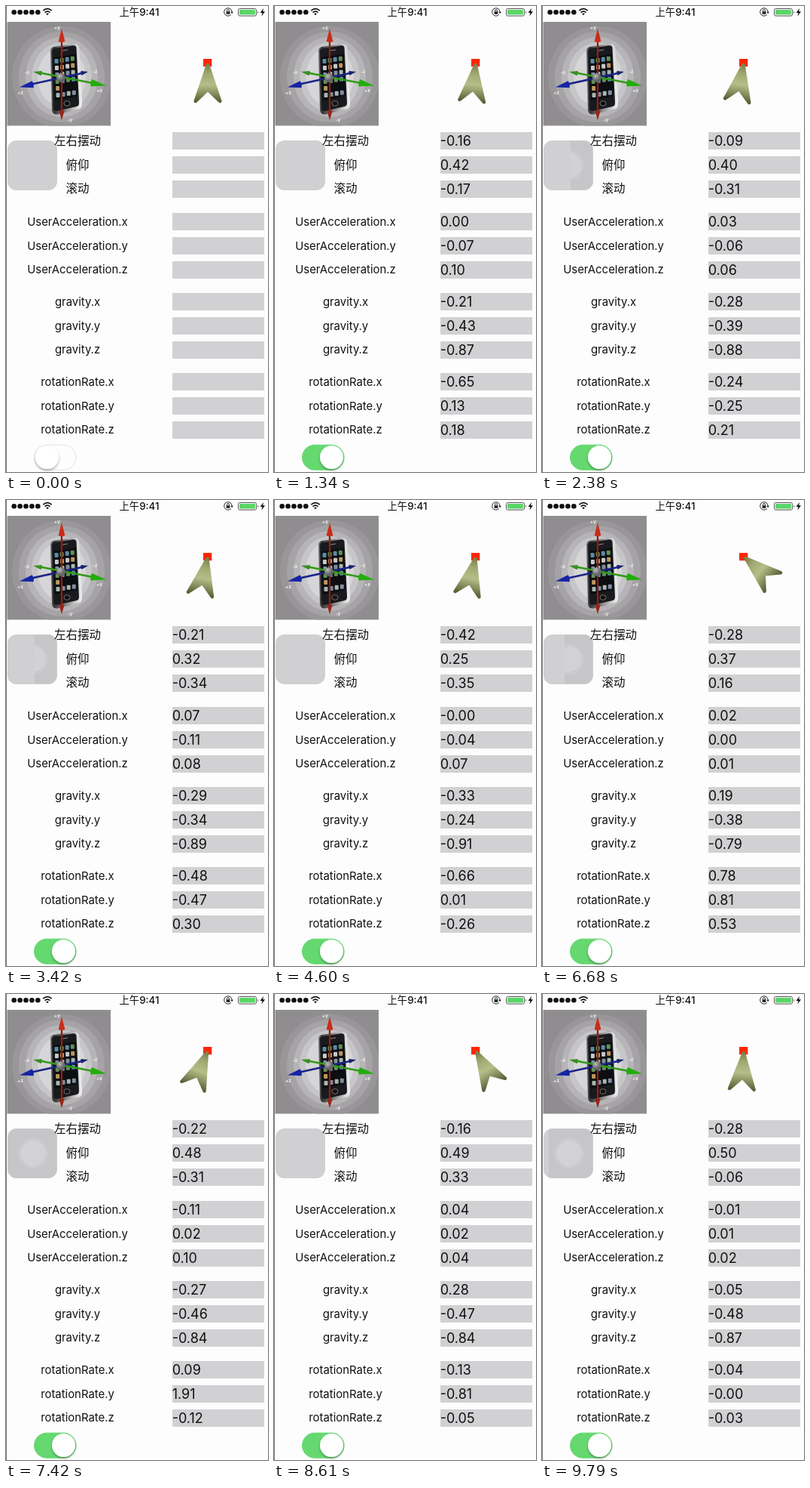
An HTML page that plays this animation: 348x617 px, repeating every 9.86 s.

```html
<!DOCTYPE html>
<html lang="zh">
<head>
<meta charset="utf-8">
<title>Device motion</title>
<style>
html, body { margin: 0; width: 100%; height: 100%; overflow: hidden; background: #fdfdfd; }
svg { display: block; width: 348px; height: 617px; }
text { font-family: Inter, "Noto Sans CJK SC", "Noto Sans CJK", sans-serif; fill: #111; }
.label { font-size: 14.9px; text-anchor: middle; }
.cjk { font-family: "Noto Sans CJK SC", "Noto Sans CJK", sans-serif; font-size: 15.5px; }
.value { font-size: 18px; }
.axis { font: bold 6.5px Inter, sans-serif; fill: #eee; text-anchor: middle; }
</style>
</head>
<body>
<svg id="stage" viewBox="0 0 348 617">
  <defs>
    <linearGradient id="olive" x1="0" y1="0" x2="0" y2="1">
      <stop offset="0" stop-color="#7a8049"/>
      <stop offset=".25" stop-color="#a1a972"/>
      <stop offset=".55" stop-color="#b5be89"/>
      <stop offset=".8" stop-color="#858b5b"/>
      <stop offset="1" stop-color="#5c6039"/>
    </linearGradient>
    <linearGradient id="rim">
      <stop offset="0" stop-color="#777"/>
      <stop offset=".1" stop-color="#333"/>
      <stop offset=".8" stop-color="#ccc"/>
      <stop offset="1" stop-color="#f2f2f2"/>
    </linearGradient>
    <radialGradient id="ball" cx=".35" cy=".3">
      <stop offset="0" stop-color="#bbb"/>
      <stop offset="1" stop-color="#666"/>
    </radialGradient>
    <filter id="shadow" x="-30%" y="-30%" width="160%" height="170%">
      <feDropShadow dx="0" dy="2" stdDeviation="1.4" flood-opacity=".32"/>
    </filter>
    <clipPath id="frame"><rect x="1.5" y="21" width="137.5" height="137.5"/></clipPath>
    <clipPath id="veil"><rect id="edge" y="178" width="68" height="66"/></clipPath>
  </defs>
  <rect width="348" height="617" fill="#fdfdfd"/>
  <rect width="1" height="617" fill="#777"/>

  <g id="status">
    <g id="dots"></g>
    <g fill="none" stroke="#111" stroke-width="1.7">
      <path d="M49.3 6.2Q55 1.2 60.7 6.2M51.5 8.7Q55 5.7 58.5 8.7"/>
      <path d="M53.2 10.2Q55 8.8 56.8 10.2L55 12.2Z" fill="#111" stroke="none"/>
    </g>
    <text x="177" y="12.6" text-anchor="middle" font-size="13.3" font-weight="500">上午9:41</text>
    <g fill="none" stroke="#222">
      <path d="M298.8 11.4A5.2 5.2 0 1 1 300.1 8"/>
      <path d="M293.4 7.5V6.4A1.6 1.6 0 0 1 296.6 6.4V7.5"/>
      <rect x="292.6" y="7.2" width="4.8" height="3.6" fill="#222" stroke="none"/>
      <path d="M298.3 7.8H301.9L300.1 10.2Z" fill="#222" stroke="none"/>
      <rect x="308.5" y="3.5" width="24" height="9.6" rx="2" stroke="#555"/>
      <rect x="310" y="5" width="21" height="6.6" rx=".8" fill="#5ad667" stroke="none"/>
      <path d="M334 6.5Q336 8.3 334 10.1Z" fill="#555" stroke="none"/>
      <path d="M342 3L337.6 9H340.4L339.4 13.6L344 7.3H341.2Z" fill="#111" stroke="none"/>
    </g>
  </g>

  <g id="picture" clip-path="url(#frame)">
    <g id="rings"></g>
    <path d="M59 60Q59 55 64 54L90 50Q96 49.5 97 55L101 129Q101 135 97 136.5L68 143.5Q62 144 61 138Z" fill="url(#rim)"/>
    <path d="M61 60Q61 57 65 56.2L89 52.3Q93 52 93.5 55.5L97 128Q97 132 94 133L68 139Q63.5 139.5 63 135Z" fill="#191a1d"/>
    <path d="M63 68L92.5 63.5L95 119L65 125.5Z" fill="#0c0e11"/>
    <g id="icons"></g>
    <ellipse cx="81" cy="129" rx="4" ry="3.4" fill="#111" stroke="#888" stroke-width=".8"/>
    <path d="M73 59.5L82 58" stroke="#888" stroke-width="1.2"/>
    <g id="axes"></g>
    <circle cx="73" cy="95" r="6" fill="url(#ball)"/>
  </g>

  <rect x="262" y="70" width="11.3" height="10.2" fill="#ff2600"/>
  <g id="pointer"><path d="M0 3L-16.3 51L0 35.5L16.3 51Z" fill="url(#olive)" stroke="url(#olive)" stroke-width="4.5" stroke-linejoin="round"/></g>

  <g id="assist">
    <rect x="2" y="178" width="66" height="66" rx="12" fill="#d0cfd2"/>
    <g clip-path="url(#veil)">
      <rect x="2.5" y="178.5" width="65" height="65" rx="11.5" fill="#c6c5c8" stroke="#cfced1"/>
      <circle cx="36" cy="211" r="19" fill="#cbcacd" stroke="#d2d1d4"/>
      <circle cx="36" cy="211" r="15.5" fill="#d2d1d4" stroke="#dad9dc"/>
    </g>
  </g>

  <g id="rows"></g>

  <rect id="track" x="37.5" y="581.2" width="55.5" height="33" rx="16.5"/>
  <circle id="knob" cy="597.5" r="15.5" fill="#fff" filter="url(#shadow)"/>
</svg>
<script>
const $ = id => document.getElementById(id);
const LOOP = 9860, STEP = 148.33;
const names = ['左右摆动', '俯仰', '滚动',
  ...['UserAcceleration', 'gravity', 'rotationRate'].flatMap(n => ['x', 'y', 'z'].map(a => n + '.' + a))];
const rowY = i => [179, 286, 392, 498][Math.floor(i / 3)] + (i % 3) * 31.7;

// step, pointer angle, then the twelve readings
const keys = [
  [16, 10, -.09, .40, -.31, .03, -.06, .06, -.28, -.39, -.88, -.24, -.25, .21],
  [31, 13, -.42, .25, -.35, -.001, -.04, .07, -.33, -.24, -.91, -.66, .01, -.26],
  [40, -120, -.40, .27, .67, .03, .08, -.08, .60, -.27, -.76, 1.28, .57, .61],
  [50, 22.5, -.22, .48, -.31, -.11, .02, .10, -.27, -.46, -.84, .09, 1.91, -.12],
  [58, -29, -.16, .49, .33, .04, .02, .04, .28, -.47, -.84, -.13, -.81, -.05],
  [66, 3, -.28, .50, -.06, -.01, .01, .02, -.05, -.48, -.87, -.04, -.001, -.03]
];
keys.unshift([0, 0, ...keys[5].slice(2)]);
const jitter = [.03, .02, .04, .06, .06, .06, .03, .02, .01, .5, .5, .3];

// step from which the dark face of the floating button shows, and its left edge
const veils = [[0, 68], [12, 38], [24, 68], [36, 30], [46, 2], [54, 68], [62, 9]];

$('dots').innerHTML = [0, 1, 2, 3, 4].map(i => `<circle cx="${10.7 + i * 7.9}" cy="8.2" r="3.3" fill="#111"/>`).join('');

$('rings').innerHTML = '<rect x="1" y="21" width="138" height="138" fill="#908d90"/>' +
  [[66, 67, '#999699'], [57, 60, '#a5a3a5'], [48, 53, '#b6b4b6'], [40, 46, '#c6c5c7'], [32, 39, '#d6d5d7']]
    .map(([rx, ry, c]) => `<ellipse cx="74" cy="94" rx="${rx}" ry="${ry}" fill="${c}"/>`).join('');

const tints = ['#5c8ba8', '#a8b6b0', '#bd9659', '#659052', '#808ca0', '#c7c9cc'];
let icons = '';
for (let r = 0; r < 6; r++) for (let c = 0; c < 4; c++) {
  if (r === 4 && c) continue;
  const x = 64.5 + c * 7.1 + r * .4, y = 70 + r * 9 - c * 1.1;
  icons += `<rect x="${x}" y="${y}" width="5" height="6" rx="1" fill="${tints[(r * 5 + c * 3) % 6]}"/>`;
}
$('icons').innerHTML = icons;

// cone with its tip at x,y, aimed at angle a
const cone = (x, y, a, len, half, fill) =>
  `<path transform="translate(${x} ${y}) rotate(${a})" d="M0 0L${-len} ${-half}Q${-len - 2} 0 ${-len} ${half}Z" fill="${fill}"/>`;
const shaft = (d, color, w) => `<path d="${d}" stroke="${color}" stroke-width="${w}"/>`;
$('axes').innerHTML =
  shaft('M32 104L103 88.5', '#1b2488', 2.6) + cone(18, 107.5, 168, 18, 4.6, '#1524a5') + cone(109, 87, -12, 9, 3, '#18236f') +
  shaft('M45 88.5L115 102', '#329b18', 2.4) + cone(133, 105.5, 11, 20, 4.8, '#23ad0b') + cone(36, 87, 191, 11, 3.2, '#3b8f24') +
  shaft('M74 44L74 141', '#8c2116', 2.3) + cone(74, 30, -90, 17, 4.4, '#c82c18') + cone(74, 151, 90, 12, 3.6, '#97261a') +
  [['+y', 68, 31], ['-y', 85, 153], ['-x', 28, 90], ['+x', 124, 114], ['+z', 19, 117], ['-z', 118, 89]]
    .map(([s, x, y]) => `<text class="axis" x="${x}" y="${y}">${s}</text>`).join('');

$('rows').innerHTML = names.map((name, i) => {
  const y = rowY(i);
  return `<text class="label ${i < 3 ? 'cjk' : ''}" x="95" y="${y + 5}">${name}</text>
    <rect x="221" y="${Math.round(y - 11.8)}" width="122" height="23" fill="#d1d0d3"/>
    <text class="value" x="220.7" y="${y + 6.2}"></text>`;
}).join('');
const values = [...document.querySelectorAll('.value')];

const lerp = (a, b, u) => a + (b - a) * u;
const clamp = u => Math.max(0, Math.min(1, u));

function drawSwitch(u) {
  $('track').setAttribute('fill', u > 0 ? '#65d86f' : '#fdfdfd');
  $('track').setAttribute('stroke', u > 0 ? '#65d86f' : '#e2e2e2');
  $('track').setAttribute('fill-opacity', u || 1);
  $('knob').setAttribute('cx', lerp(54.5, 76.5, u));
}

function draw(t) {
  const step = Math.min(66, Math.floor((t + 4) / STEP));
  let k = 0;
  while (k < keys.length - 2 && step >= keys[k + 1][0]) k++;
  const a = keys[k], b = keys[k + 1];
  const u = (step - a[0]) / (b[0] - a[0]);
  const ease = u * u * (3 - 2 * u), swing = Math.sin(Math.PI * u);
  $('pointer').setAttribute('transform', `translate(268 75) rotate(${lerp(a[1], b[1], ease)})`);
  values.forEach((el, i) => {
    const v = lerp(a[i + 2], b[i + 2], ease) + jitter[i] * swing * Math.sin(step * 1.7 + i * 2.3);
    el.textContent = step < 5 ? '' : v.toFixed(2);
  });
  drawSwitch(clamp((step - 2) / 3));
  $('edge').setAttribute('x', veils.filter(v => step >= v[0]).pop()[1]);
}

const start = performance.now();
function tick(now) {
  draw(Math.max(0, now - start) % LOOP);
  requestAnimationFrame(tick);
}
draw(0);
requestAnimationFrame(tick);
</script>
</body>
</html>
```
